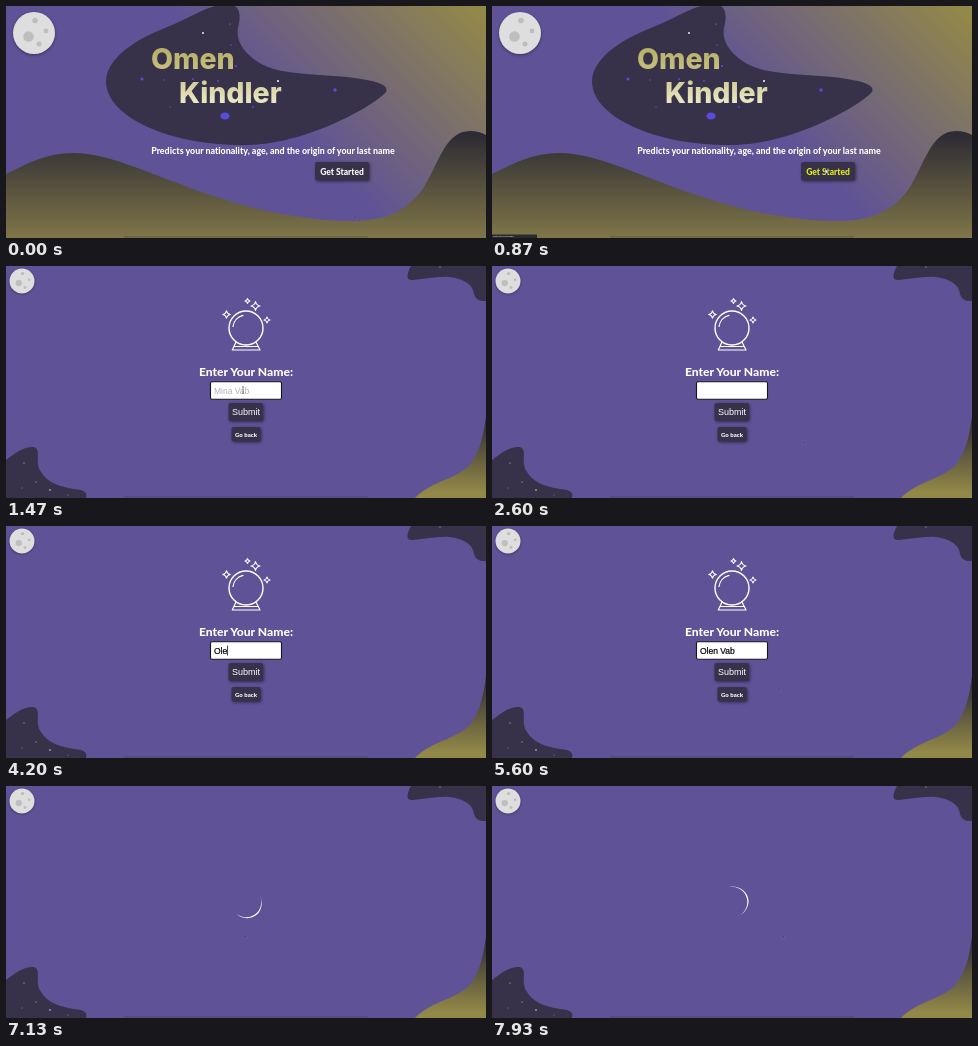
Write an HTML page that moves like this. It is 480 px wide and 232 px high and loops after 8000 ms.

```html
<!DOCTYPE html>
<html lang="en">
<head>
<meta charset="utf-8">
<title>Omen Kindler</title>
<style>
  html, body { margin: 0; width: 100%; height: 100%; overflow: hidden; background: #5f5297; }
  svg { display: block; width: 100vw; height: 100vh; }
  text { font-family: Lato, sans-serif; font-weight: 800; font-variant-ligatures: none; fill: #fff; white-space: pre; }
  .mid { text-anchor: middle; }
  .title { font: 800 28.5px Inter, sans-serif; fill: url(#gold); }
  .arial { font: 8.5px "Liberation Sans", Arial, sans-serif; }
  .field { fill: #000; stroke: #000; stroke-width: .2; }
  .hint { fill: #b3afba; }
  .dark { fill: #37324a; }
  .button rect { fill: #37324a; filter: drop-shadow(1px 1.5px 1.5px #0007); }
  .hover text { fill: #e6ee1c; }
  .line { fill: none; stroke: #fff; stroke-width: 1.4; stroke-linejoin: round; stroke-linecap: round; }
</style>
</head>
<body>
<svg viewBox="0 0 480 232" preserveAspectRatio="none">
  <defs>
    <linearGradient id="sky" gradientUnits="userSpaceOnUse" x1="62" y1="294" x2="418" y2="-62">
      <stop offset=".55" stop-color="#5f5297"/><stop offset=".98" stop-color="#928848"/>
    </linearGradient>
    <linearGradient id="hill" gradientUnits="userSpaceOnUse" x1="0" y1="128" x2="0" y2="232">
      <stop stop-color="#2d2b34"/><stop offset="1" stop-color="#7f7648"/>
    </linearGradient>
    <linearGradient id="corner" gradientUnits="userSpaceOnUse" x1="0" y1="152" x2="0" y2="226">
      <stop stop-color="#2d2b34"/><stop offset="1" stop-color="#928848"/>
    </linearGradient>
    <linearGradient id="gold" gradientUnits="userSpaceOnUse" x1="0" y1="38" x2="0" y2="102">
      <stop stop-color="#b4ac62"/><stop offset=".4" stop-color="#c6c07e"/><stop offset="1" stop-color="#f0edd0"/>
    </linearGradient>
    <g id="moon">
      <circle r="21" fill="#dedede" style="filter:drop-shadow(0 1px 1.5px #0006)"/>
      <g fill="#bebebe">
        <circle cx="-5.5" cy="3.5" r="5.3"/><circle cx="1" cy="-12.5" r="2.8"/>
        <circle cx="12" cy="-2" r="2.4"/><circle cx="5" cy="11" r="2.5"/>
      </g>
    </g>
    <path id="sparkle" d="M0-5Q.8-.8 5 0Q.8.8 0 5Q-.8.8-5 0Q-.8-.8 0-5Z" class="line" vector-effect="non-scaling-stroke" style="stroke-width:1.2"/>
    <rect id="edge" x="118" y="230" width="244" height="2" fill="#3b3944" opacity=".25"/>
  </defs>

  <g id="home">
    <rect width="480" height="232" fill="url(#sky)"/>
    <path class="dark" d="M100 76C100 53 128 34 160 21.5C185 12 200-1 222-2C235-1 235 10 232 22C229 37 242 53 262 61C288 71 330 67 366 75C378 78 382 81 380 86C364 103 296 139 240 139C166 140 101 112 100 76Z"/>
    <g fill="#5a4bdb">
      <ellipse cx="219" cy="110" rx="4.6" ry="3.6"/>
      <circle cx="136" cy="73" r="1.5"/><circle cx="329" cy="84" r="1.7"/>
      <circle cx="187" cy="73" r=".9"/><circle cx="212" cy="75" r=".9"/>
      <circle cx="225" cy="39" r=".8"/><circle cx="247" cy="101" r=".9"/>
      <circle cx="158" cy="74" r=".8"/><circle cx="230" cy="60" r="1.1"/>
      <circle cx="164" cy="101" r=".7"/>
    </g>
    <g fill="#fff">
      <circle cx="197" cy="27" r=".9"/><circle cx="272" cy="75" r="1"/><circle cx="224" cy="18" r=".4"/>
    </g>
    <text class="title" x="145" y="62.5">Omen</text>
    <text class="title" x="173" y="97">Kindler</text>
    <path fill="url(#hill)" d="M0 168C24 156 42 147 68 147C128 147 214 213 344 215C380 215 400 205 416 184C432 161 438 125 464 125Q473 125 480 129V232H0Z"/>
    <text class="mid" x="267" y="148" font-size="8.9">Predicts your nationality, age, and the origin of your last name</text>
    <g class="button" id="start">
      <rect x="309" y="156" width="54" height="18.5" rx="2"/>
      <text class="mid" x="336" y="168.7" font-size="8.5">Get Started</text>
    </g>
    <use href="#edge"/>
    <g id="status">
      <rect y="228.5" width="45" height="3.5" fill="#292930"/>
      <text x="1" y="231.3" font-size="2.4" fill="#aaa" style="fill:#aaa">open the next page</text>
    </g>
    <use href="#moon" x="28" y="27"/>
  </g>

  <g id="inner">
    <rect width="480" height="232" fill="#5f5297"/>
    <path class="dark" d="M405 0C400 9 400 15 407 14C420 13 431 10 444 11C459 13 467 19 468 28Q470 36 480 35V0Z"/>
    <path class="dark" d="M0 194C10 186 19 180 28 181C36 184 28 196 35 206C44 220 61 222 75 224Q82 226 80 232H0Z"/>
    <g fill="#ddd">
      <circle cx="44" cy="224" r=".8"/><circle cx="30" cy="216" r=".5"/><circle cx="18" cy="197" r=".5"/>
      <circle cx="62" cy="229" r=".4"/><circle cx="16" cy="222" r=".4"/><circle cx="434" cy="1" r=".5"/>
    </g>
    <path fill="url(#corner)" d="M409 232C426 214 454 213 466 196C474 184 478 168 480 150V232Z"/>
    <use href="#edge"/>
    <use href="#moon" transform="translate(16 15) scale(.595)"/>

    <g id="form">
      <g class="line">
        <circle cx="240" cy="62" r="17"/>
        <path d="M227 60.5A13.3 13.3 0 0 1 237 49.3M230 76L226.3 84H254L250 76M228.5 80.5H251.5" style="stroke-width:1.2"/>
      </g>
      <use href="#sparkle" transform="translate(249.5 40) scale(.9)"/>
      <use href="#sparkle" transform="translate(241.5 35) scale(.5)"/>
      <use href="#sparkle" transform="translate(220.5 48.5) scale(.75)"/>
      <use href="#sparkle" transform="translate(261 54) scale(.6)"/>
      <text class="mid" x="240" y="109.5" font-size="12.1">Enter Your Name:</text>
      <rect x="204.5" y="115.7" width="71" height="17.6" rx="1.5" fill="#fff" stroke="#17151c" stroke-width="1.1"/>
      <text class="arial hint" id="hint" x="208" y="128">Mina Vab</text>
      <text class="arial field" id="typed" x="208" y="128"></text>
      <rect id="caret" y="119.5" width=".8" height="10" fill="#111"/>
      <g class="button" id="submit">
        <rect x="222.5" y="137" width="34.5" height="18" rx="2"/>
        <text class="arial mid" x="240" y="149.3" style="font-size:9px">Submit</text>
      </g>
      <g class="button">
        <rect x="225.5" y="161" width="29" height="14.5" rx="2"/>
        <text class="mid" x="240" y="170.7" font-size="6">Go back</text>
      </g>
    </g>
    <path id="spinner" fill="#fff" d="M-15.3 0A15.3 15.3 0 0 0 15.3 0A15.3 16.6 0 0 1-15.3 0Z"/>
  </g>

  <path id="arrow" d="M0 0V4.6L1.2 3.6L2 5L2.8 4.6L2 3.2H3.4Z" fill="#3d3757" stroke="#a9a2c8" stroke-width=".3" opacity=".45"/>
  <path id="hand" d="M0-2V3H3V0H1V-2Z" fill="#eee" stroke="#333" stroke-width=".5"/>
  <path id="beam" d="M-1-3.5Q0-3.5 0-2.5V2.5Q0 3.5 1 3.5M1-3.5Q0-3.5 0-2.5M0 2.5Q0 3.5-1 3.5" fill="none" stroke="#555" stroke-width=".6"/>
</svg>
<script>
const LOOP = 8000;
const NAME = "Olen Vab";
const KEY_TIMES = [3930, 4070, 4200, 4330, 4470, 4670, 4730, 4870];
const CARET_ON = [[2200, 2600], [3130, 3730], [3930, 5400], [5930, 6070]];
const OPENED = 930, FOCUSED = 2200, SENT = 6070;
// Pointer path: time, x, y
const POINTER = [
  [70, 348, 209], [800, 333, 164], [930, 333, 164], [1130, 350, 194], [1250, 350, 194],
  [1470, 237, 124], [2100, 237, 124], [2270, 311, 174], [5350, 311, 174],
  [5600, 286, 161], [5870, 238, 148], [7130, 238, 148], [7850, 290, 148]
];

const el = Object.fromEntries([...document.querySelectorAll("[id]")].map(e => [e.id, e]));
const show = (e, on) => { e.style.display = on ? "" : "none"; };
const inside = ([x, y], l, t, r, b) => x > l && x < r && y > t && y < b;

function pointerAt(t) {
  const next = POINTER.findIndex(p => p[0] > t);
  if (next === 0) return POINTER[0].slice(1);
  if (next < 0) return POINTER.at(-1).slice(1);
  const [a, b] = [POINTER[next - 1], POINTER[next]];
  const k = (t - a[0]) / (b[0] - a[0]);
  return [a[1] + (b[1] - a[1]) * k, a[2] + (b[2] - a[2]) * k];
}

function draw(t) {
  const home = t < OPENED, loading = t >= SENT;
  const pos = pointerAt(t);
  const onStart = home && inside(pos, 309, 156, 364, 175);
  const onSubmit = !home && !loading && inside(pos, 222, 137, 258, 155);
  const onInput = !home && !loading && inside(pos, 204, 115, 276, 134);

  show(el.home, home);
  show(el.inner, !home);
  show(el.form, !loading);
  show(el.spinner, loading);
  show(el.status, onStart);
  el.start.classList.toggle("hover", onStart);
  el.submit.classList.toggle("hover", onSubmit);

  const typed = NAME.slice(0, KEY_TIMES.filter(k => k <= t).length);
  if (el.typed.textContent !== typed) el.typed.textContent = typed;
  show(el.hint, t < FOCUSED);
  const caretOn = CARET_ON.some(([from, to]) => t >= from && t < to);
  show(el.caret, caretOn);
  if (caretOn) el.caret.setAttribute("x", 208 + (typed ? el.typed.getComputedTextLength() : 0));

  const angle = 63 + (t - 6400) * 0.36;
  el.spinner.setAttribute("transform", `translate(240 116) rotate(${angle})`);

  const hidden = t >= KEY_TIMES[0] && t < 5400;
  const hand = onStart || onSubmit;
  show(el.hand, hand && !hidden);
  show(el.beam, onInput && !hidden);
  show(el.arrow, !hand && !onInput && !hidden);
  for (const e of [el.hand, el.beam, el.arrow]) e.setAttribute("transform", `translate(${pos})`);
}

function tick() {
  draw(performance.now() % LOOP);
  requestAnimationFrame(tick);
}
tick();
</script>
</body>
</html>
```
